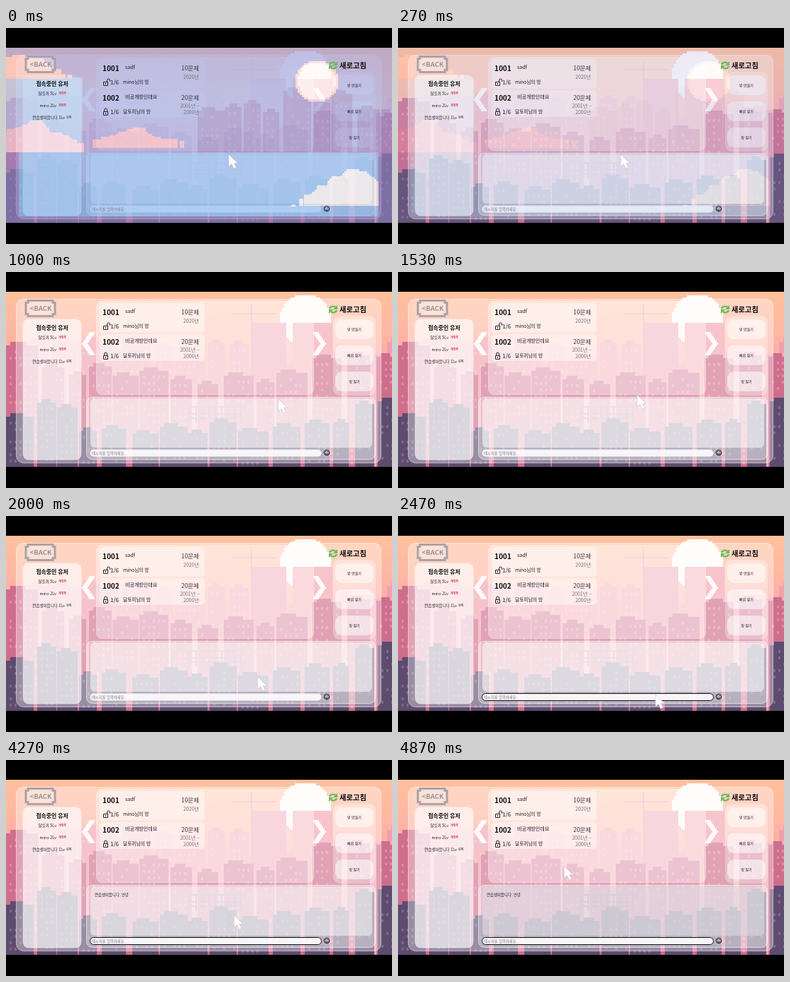
Recreate the animation shown at these times as an HTML page with a canvas. Size 544 px wide and 306 px high, loop 4.94 s.

```html
<!DOCTYPE html>
<html lang="ko">
<head>
<meta charset="utf-8">
<style>
html, body { margin: 0; width: 100%; height: 100%; overflow: hidden; background: #000; }
canvas, svg { position: absolute; left: 0; top: 0; width: 544px; height: 306px; }
text { font-family: "Noto Sans CJK KR", "Noto Sans KR", "Noto Sans", sans-serif; fill: #1d1922; }
.b { font-weight: 700; fill: #0b0b0d; }
.l { font-weight: 300; fill: #3d3741; }
.g { fill: #77707c; }
.m { text-anchor: middle; }
.e { text-anchor: end; }
.tag { font-size: 4px; font-weight: 700; fill: #d8374c; }
.tag.idle { fill: #4d584f; }
</style>
</head>
<body>
<canvas id="day" width="544" height="306"></canvas>
<canvas id="dusk" width="544" height="306"></canvas>
<svg viewBox="0 0 544 306">
  <rect id="shade" x="119" y="179" width="397" height="70" rx="6" fill="#4a4260" opacity="0"/>
  <path d="M31 40.500H66V43.500H69V59.500H66V62.500H31V59.500H28V43.500H31Z" fill="#fff" fill-opacity=".3" stroke="#aaa2ab" stroke-width="3"/>
  <text x="49" y="55" class="b m" font-size="9.500" style="fill:#99929c">&lt;BACK</text>
  <path d="M456 52a5 4.500 0 0 1 8.500-2M466 54a5 4.500 0 0 1-8.500 2" fill="none" stroke="#65bd54" stroke-width="2.200"/>
  <path d="M467 47v6h-6zM455 59v-6h6z" fill="#65bd54"/>
  <text x="470" y="57" class="b" font-size="10.300">새로고침</text>
  <text x="65" y="82" class="b m" font-size="7.800">접속중인 유저</text>
  <g id="lists"></g>
  <g fill="none" stroke="#27222b">
    <circle cx="452" cy="256" r="3.800"/>
    <path d="M450.500 254v1M453.500 254v1M449.500 257q2.500 3 5 0"/>
    <rect id="focus" x="118.500" y="251.500" width="326" height="10" rx="5" stroke="#111"/>
  </g>
  <text id="chat" x="125" y="193" font-size="5.400">연습생이랍니다: 안녕</text>
  <text id="entry" x="121" y="258.500" font-size="5.300"></text>
  <path id="mouse" d="M0 0V17L4 13.500L7 20L10.500 18.500L7.500 12.500H12.500Z" fill="#fff" stroke="#cbbfc9" stroke-width=".6"/>
  <path d="M0 0H544V28H0ZM0 276H544V306H0Z"/>
</svg>
<script>
const $ = id => document.getElementById(id);
const clamp = v => Math.max(0, Math.min(1, v));
const ease = v => v * v * (3 - 2 * v);

let seed = 7;
function rnd() {
  seed = seed * 16807 % 2147483647;
  return seed / 2147483647;
}

function scene(id, sky) {
  const c = $(id).getContext('2d'), g = c.createLinearGradient(0, 28, 0, 276);
  sky.forEach((color, i) => g.addColorStop(i / (sky.length - 1), color));
  box(c, 0, 28, 544, 248, g);
  return c;
}

function box(c, x, y, w, h, color) {
  c.fillStyle = color;
  c.fillRect(x, y, w, h);
}

// disc made of 3px cells
function disc(c, x, y, r, color) {
  for (let j = -r; j < r; j += 3) {
    const w = Math.round(Math.sqrt(r * r - j * j) / 3) * 3;
    box(c, x - w, y + j, w * 2, 3, color);
  }
}

// flat-bottomed heap of discs, highest at `peak` (0..1)
function cloud(c, x, base, w, h, peak, color) {
  for (let i = 0; i <= 1; i += 0.1) {
    const top = h * (1 - Math.abs(i - peak)) * (0.7 + 0.3 * rnd());
    const r = Math.round(top / 9) * 3;
    disc(c, Math.round(x + i * w), Math.round(base - top + r), r, color);
    box(c, Math.round(x + i * w) - r, Math.round(base - top + r), r * 2, Math.round(top - r), color);
  }
}

// row of buildings, taller by `lift` towards both edges
function city(c, color, lit, top, spread, lift, from = 0) {
  for (let x = from; x < 544;) {
    const w = 22 + Math.round(rnd() * 24), edge = Math.abs(x + w / 2 - 272) / 272;
    const y = Math.round(top - lift * edge * edge + (rnd() - 0.5) * spread);
    box(c, x, y, w, 276 - y, color);
    box(c, x + 6, y - 5, w >> 1, 5, color);
    for (let j = y + 7; j < 270; j += 9)
      for (let i = x + 5; i < x + w - 4; i += 7)
        if (rnd() < 0.5) box(c, i, j, 3, 4, lit);
    x += w + Math.round(rnd() * 10);
  }
}

function panel(c, x, y, w, h, r, alpha, edge = 0) {
  c.beginPath();
  c.roundRect(x, y, w, h, r);
  c.fillStyle = `rgba(255,255,255,${alpha})`;
  c.fill();
  c.strokeStyle = `rgba(255,255,255,${edge})`;
  c.stroke();
}

function arrow(c, x, dir) {
  for (let i = -5; i <= 5; i++) box(c, x + dir * Math.abs(i) * 2 - 4, 100 + i * 3, 8, 3, '#fffafb');
}

const day = scene('day', ['#ffc19d', '#ffb5a3', '#f9a5ab', '#ef94a7', '#dc7f9b']);
disc(day, 422, 66, 36, '#fffaf7');
city(day, '#f0a0ae', '#f5b0b6', 112, 40, 0);
box(day, 345, 72, 50, 204, '#eb9aab');
box(day, 318, 58, 62, 2, '#eb9aab');
box(day, 345, 46, 2, 26, '#eb9aab');
box(day, 404, 72, 56, 204, '#f3a3ae');
city(day, '#cf6d8d', '#df8b9f', 152, 30, 45);
for (const y of [190, 200, 206]) box(day, 258, y, 74, 2, '#a9688b');
for (let x = 258; x < 334; x += 9) box(day, x, 190, 2, 24, '#a9688b');
city(day, '#5d4c6f', '#826787', 226, 36, 42);

panel(day, 14.5, 38.5, 514, 232, 10, 0.36, 0.5);
panel(day, 24, 67, 82, 199, 8, 0.64, 0.4);
panel(day, 127.5, 41.5, 306, 132, 8, 0.36, 0.4);
panel(day, 132, 44, 148, 42, 5, 0.4);
panel(day, 132, 88, 148, 38, 5, 0.4);
panel(day, 461, 62, 60, 113, 9, 0.3);
for (let i = 0; i < 3; i++) panel(day, 464, 67 + i * 37, 54, 28, 9, 0.55);
panel(day, 113.5, 177.5, 407, 88, 8, 0.3, 0.6);
panel(day, 119, 179, 397, 70, 6, 0.52);
panel(day, 118.5, 251.5, 326, 10, 5, 0.88);
arrow(day, 111, 1);
arrow(day, 447, -1);

// the evening view fades out above the panels but below the text
const dusk = scene('dusk', ['#9f9cd8', '#9dafe6', '#9ca6e2', '#9cabe4']);
box(dusk, 0, 70, 108, 106, '#a6c9f2');
city(dusk, '#928fcb', '#9b9ad2', 108, 50, 0, 270);
cloud(dusk, 0, 72, 90, 48, 0.2, '#f8ccc8');
cloud(dusk, 0, 176, 104, 52, 0.4, '#f6d9e4');
cloud(dusk, 128, 170, 120, 36, 0.4, '#f5c3cc');
disc(dusk, 438, 74, 30, '#ffd6d3');
disc(dusk, 438, 74, 27, '#fffaf8');
box(dusk, 0, 176, 544, 100, '#8f82c0');
box(dusk, 18, 176, 507, 91, '#86b8f1');
cloud(dusk, 405, 252, 105, 70, 0.9, '#f3f1f2');

const text = (x, y, size, str, cls = '') =>
  `<text x="${x}" y="${y}" font-size="${size}" class="${cls}">${str}</text>`;
const users = [['달토끼 5Lv', '게임중'], ['mino 2Lv', '게임중'], ['연습생이랍니다 1Lv', '로비']];
const rooms = [['1001', 'sadf', '10문제', '', '2020년', 'mino'],
  ['1002', '비공개방인데요', '20문제', '2001년 ~', '2000년', '달토끼']];

$('lists').innerHTML =
  users.map(([name, state], i) =>
    text(i < 2 ? 71 : 83, 95 + i * 17, 5.5, name, 'e') +
    text(i < 2 ? 74 : 85, 94 + i * 17, 4, state, i < 2 ? 'tag' : 'tag idle')).join('') +
  rooms.map(([id, title, count, since, until, host], i) => {
    const y = i * 42;
    return text(136, y + 61, 10, id, 'b') + text(168, y + 58, 7, title) +
      text(272, y + 60, 8.5, count, 'l e') + text(273, y + 71, 7, since, 'g e') +
      text(272, i ? 122 : 72, 7, until, 'g e') +
      text(147, y + 80, 8, '1/6') + text(165, y + 79, 6.7, host + '님의 방') +
      `<path fill="none" stroke="#27222b" d="M137.5 ${y + 76.5}h6v5h-6z
        M${i ? 138.5 : 142.5} ${y + 76}v-2a2 2 0 0 1 4 0v2M140.5 ${y + 78}v2"/>`;
  }).join('') +
  ['방 만들기', '빠른 찾기', '방 찾기'].map((s, i) => text(491, 83 + i * 37, 5, s, 'm')).join('');

// [start ms, end ms, x, y]
const moves = [[600, 930, 384, 180], [1100, 1530, 337, 174], [1670, 2200, 363, 253], [4070, 4600, 234, 150]];

function draw(now) {
  const t = now % 4940;
  let x = 314, y = 179;
  for (const [a, b, toX, toY] of moves) {
    const k = ease(clamp((t - a) / (b - a)));
    x += (toX - x) * k;
    y += (toY - y) * k;
  }
  $('mouse').setAttribute('transform', `translate(${x} ${y})`);
  $('dusk').style.opacity = 0.65 * clamp(1 - t / 530) ** 1.8;
  $('shade').setAttribute('opacity', 0.1 * clamp((t - 4070) / 800));
  $('focus').style.display = t >= 2270 ? '' : 'none';
  $('chat').style.display = t >= 4070 ? '' : 'none';
  const typed = t >= 3600 && t < 4070;
  $('entry').textContent = typed ? '안녕'.slice(0, t < 3800 ? 1 : 2) : '메시지를 입력하세요..';
  $('entry').style.fill = typed ? '#222' : '#817a84';
  requestAnimationFrame(draw);
}
requestAnimationFrame(draw);
</script>
</body>
</html>
```
